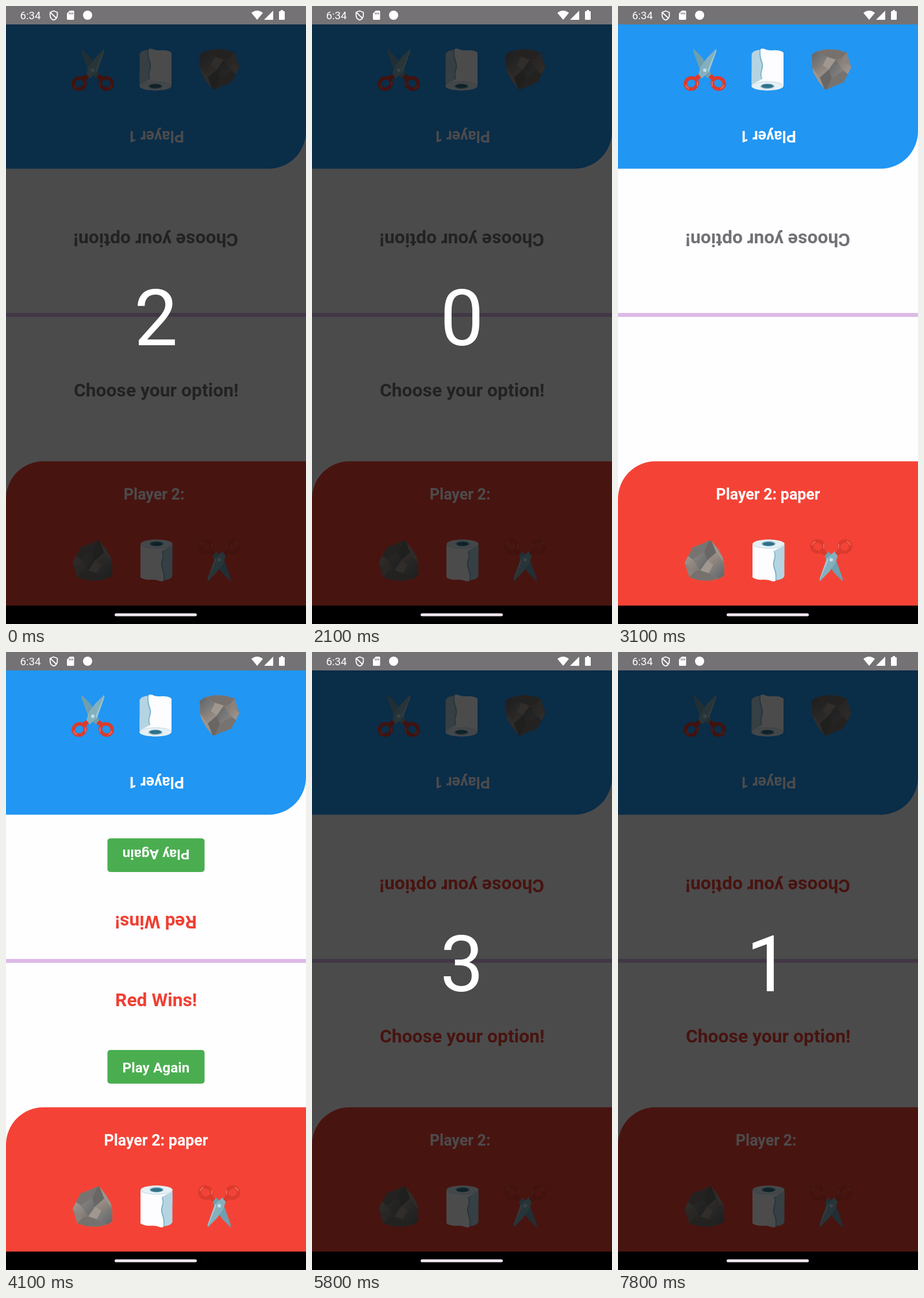
These frames come from a looping animation (522x1073 px, 8000 ms). An HTML page:

```html
<!DOCTYPE html>
<html lang="en">
<head>
<meta charset="utf-8">
<title>Rock paper scissors</title>
<style>
html, body { margin: 0; width: 100%; height: 100%; overflow: hidden; background: #000; }
svg { display: block; width: 522px; height: 1073px; font-family: Roboto, sans-serif; }
text { text-anchor: middle; white-space: pre; }
.big, .label, .btn { font-weight: 700; }
.big { font-size: 31.8px; }
.label { font-size: 26.8px; fill: #fffdff; }
.btn { font-size: 24.4px; fill: #fdfdfd; }
</style>
</head>
<body>
<svg viewBox="0 0 522 1073">
  <defs>
    <linearGradient id="dusk" x1="0" y1="0" x2="1" y2="1">
      <stop offset="0" stop-color="#8f8a86"/><stop offset="1" stop-color="#5f6368"/>
    </linearGradient>
    <linearGradient id="warm" x1="0" y1="0" x2="1" y2="1">
      <stop offset="0" stop-color="#a39a93"/><stop offset="1" stop-color="#7d746e"/>
    </linearGradient>
    <g id="rock">
      <path fill="#8b827d" d="M116 967L122 955 130 940 146 934 159 928 163 929 174 943 182 957 185 970 185 988 177 994 159 998 140 997 124 992Z"/>
      <path fill="#777370" d="M122 955L130 940 146 934 159 928 150 949 131 962Z"/>
      <path fill="url(#dusk)" d="M130 961L150 948 155 963 143 980Z"/>
      <path fill="url(#warm)" d="M116 967L122 955 130 961 143 980 133 982Z"/>
      <path fill="#696765" d="M159 928L163 929 171 949 155 963 150 948Z"/>
      <path fill="#9d948c" d="M163 929L174 943 182 957 184 966 171 949Z"/>
      <path fill="url(#warm)" d="M155 963L171 949 184 966 166 970Z"/>
      <path fill="#a0978f" d="M155 963L166 970 158 985 143 980Z"/>
      <path fill="url(#dusk)" d="M166 970L184 966 185 988 177 994 158 985Z"/>
      <path fill="#77716d" d="M133 982L143 980 158 985 177 994 159 998 140 997 124 992Z"/>
    </g>
    <g id="paper">
      <path fill="#b5d4e2" d="M262 935H289.500V990Q287 996 274 997L262 990Z"/>
      <path fill="#8fbfd2" d="M271 946Q276 950 274 960 270 968 273 975 277 983 275 997L270 995Z"/>
      <path fill="#fdfcff" d="M234 934V992Q240 997 254 996 262 996 266 998 271 1000 274 998 275 987 272 977 269 969 272 961 274 953 271 946L289 937 262 930Z"/>
      <path fill="#b5d4e2" d="M272 946Q283 945 289.500 938V960H273Q275 952 272 946Z"/>
      <path fill="none" stroke="#6badc6" stroke-width="1.300" d="M271.500 947Q275 953 272 961 269 969 272 977 276 986 274.500 998"/>
      <ellipse cx="262" cy="934" rx="27.800" ry="7.700" fill="#e6f0f5"/>
      <path fill="none" stroke="#bcd8e4" d="M234.500 934A27.500 7.500 0 0 0 289.500 934"/>
      <ellipse cx="262" cy="933.500" rx="12.500" ry="4.700" fill="#9fc5d4"/>
      <ellipse cx="262" cy="934" rx="10.500" ry="3.600" fill="#2f7188"/>
    </g>
    <g id="handle">
      <path stroke="#db3b2e" stroke-width="8" d="M355 946L362 952"/>
      <ellipse cx="347.500" cy="938.500" rx="10.500" ry="9.600" transform="rotate(28 347.500 938.500)" fill="none" stroke="#db3b2e" stroke-width="6"/>
      <path fill="none" stroke="#f0685b" stroke-width="2.200" stroke-linecap="round" d="M338 935Q340 931 343 930M358 935Q359 938 358 941"/>
    </g>
    <g id="scissors">
      <path fill="#6f9fae" d="M359 952L365 947 378 958 391 994 391 999 376 984 365 969Z"/>
      <path fill="#84b0be" d="M383 952L377 947 364 958 351 994 351 999 367 983 378 968Z"/>
      <path fill="#a2c8d3" d="M364 958L351 994V997L366 962Z"/>
      <use href="#handle"/>
      <use href="#handle" transform="matrix(-1 0 0 1 742 0)"/>
      <circle cx="371" cy="961.500" r="3" fill="#c0e2ea"/>
    </g>
  </defs>

  <rect width="522" height="1073" fill="#fefdff"/>
  <g id="top" transform="rotate(180 261 536.500)"></g>
  <g id="bottom"></g>
  <rect y="533" width="522" height="6.700" fill="#dcb9e7"/>
  <rect id="shade" y="32" width="522" height="1009" opacity=".7"/>
  <text id="count" x="261" y="589" font-size="135" fill="#fff"></text>

  <rect width="522" height="32" fill="#747274"/>
  <g fill="#fff">
    <text x="42.500" y="23" font-size="18.800">6:34</text>
    <path fill="none" stroke="#fff" stroke-width="1.800" d="M83 8.500L89.300 11V16Q89.300 22 83 24.500 76.700 22 76.700 16V11ZM77.500 11.500L87.500 21"/>
    <path fill-rule="evenodd" d="M111 8H117Q118.500 8 118.500 9.500V22.500Q118.500 24 117 24H107.500Q106 24 106 22.500V13ZM109.500 11.500V14.500H111V11.500ZM112.200 11.500V14.500H113.700V11.500ZM115 11.500V14.500H116.500V11.500Z"/>
    <circle cx="142" cy="16" r="8"/>
    <path d="M427 12Q437 4 447 12L437 24Z"/>
    <path d="M465 8V24H449Z"/>
    <path d="M478 7H482V9H484Q485 9 485 10V23Q485 24 484 24H476Q475 24 475 23V10Q475 9 476 9H478Z"/>
  </g>
  <rect y="1041" width="522" height="32"/>
  <rect x="189" y="1054.500" width="143" height="5" rx="2.500" fill="#f1e8f2"/>
</svg>
<script>
const $ = id => document.getElementById(id);

function buildSide(id, color) {
  const root = $(id);
  root.innerHTML = `
    <path fill="${color}" d="M0 1041V855.500A65 65 0 0 1 65 790.500H522V1041Z"/>
    <text class="label" x="261" y="856.500"></text>
    <use class="rock" href="#rock"/><use class="paper" href="#paper"/><use href="#scissors"/>
    <text class="big choose" x="261.300" y="678">Choose your option!</text>
    <g class="result">
      <text class="big" x="261.300" y="615" fill="#f03f32">Red Wins!</text>
      <g class="again">
        <rect x="176.500" y="691" width="169" height="58.500" rx="5" fill="#4aae50"/>
        <text class="btn" x="261" y="730">Play Again</text>
      </g>
    </g>`;
  return name => root.querySelector("." + name);
}

const top1 = buildSide("top", "#2196f3");
const bottom2 = buildSide("bottom", "#f44336");
top1("label").textContent = "Player 1";

// [start ms, countdown digit]
const counts = [[0, "2"], [1100, "1"], [2100, "0"], [2200, ""], [5800, "3"], [6800, "2"], [7800, "1"]];
// [start ms, opacity] of each pressed control
const paperPress = [[0, 1], [2700, .6], [2800, .2], [2900, .26], [3000, .74], [3100, 1]];
const rockPress = [[0, 1], [3700, .2], [3900, .26], [4000, .74], [4100, 1]];
const againPress = [[0, 1], [5600, .2]];

const at = (steps, t) => steps.findLast(s => s[0] <= t)[1];
const show = (el, on) => el.style.display = on ? "" : "none";

function draw(t) {
  const digit = at(counts, t);
  const picked = t >= 2900 && t < 5800;
  const done = t >= 3900 && t < 5800;
  const tint = t >= 5800 ? "#f03f32" : "#727173";

  $("count").textContent = digit;
  show($("shade"), digit !== "");
  bottom2("label").textContent = picked ? "Player 2: paper" : "Player 2:\u00a0";
  show(bottom2("choose"), !picked);
  show(top1("choose"), !done);
  for (const side of [top1, bottom2]) {
    show(side("result"), done);
    side("choose").setAttribute("fill", tint);
  }
  bottom2("paper").style.opacity = at(paperPress, t);
  top1("rock").style.opacity = at(rockPress, t);
  top1("again").style.opacity = at(againPress, t);
}

const start = performance.now();
function tick() {
  draw((performance.now() - start) % 8000);
  requestAnimationFrame(tick);
}
tick();
</script>
</body>
</html>
```
